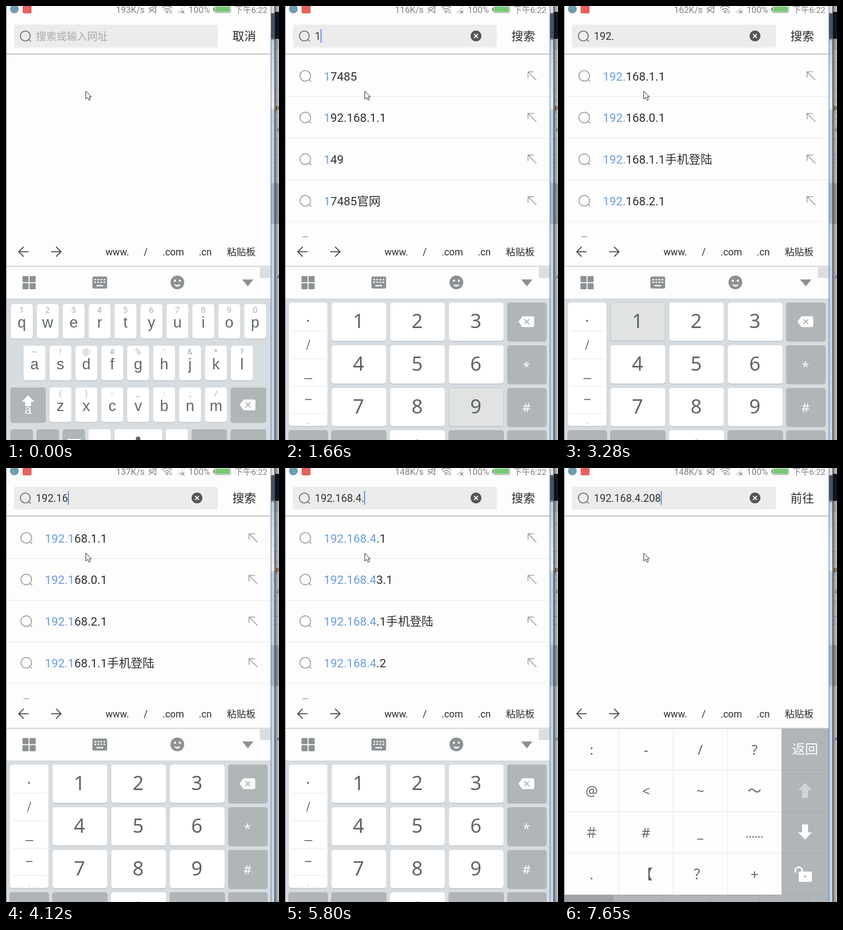
An HTML page that plays this animation: 556 by 884 pixels, repeating every 8 s.

```html
<!DOCTYPE html>
<html lang="zh">
<head>
<meta charset="utf-8">
<style>
html, body { margin: 0; width: 100%; height: 100%; overflow: hidden; background: #fff; }
svg { display: block; font-family: Roboto, "Noto Sans CJK SC", "Noto Sans CJK", sans-serif; }
.arial { font-family: "Liberation Sans", Arial, sans-serif; }
.noto { font-family: "Noto Sans", "Noto Sans CJK SC", "Noto Sans CJK", sans-serif; font-weight: 500; }
</style>
</head>
<body>
<svg id="stage" width="556" height="884" viewBox="0 0 556 884"></svg>
<script>
const LOOP = 8000;
const GRAY = '#b0b5b8', INK = '#5f6569', ICON = '#8c9194', BOARD = '#d7dce0';

const first = ['17485', '192.168.1.1', '149', '17485官网'];
const second = ['192.168.1.1', '1920', '192.168.0.1', '19寸'];
const home = ['192.168.1.1', '192.168.0.1', '192.168.1.1手机登陆', '192.168.2.1'];
const sorted = ['192.168.1.1', '192.168.0.1', '192.168.2.1', '192.168.1.1手机登陆'];
const fourth = ['192.168.4.1', '192.168.43.1', '192.168.4.1手机登陆', '192.168.4.2'];

// Each step changes only the listed parts of the state.
const steps = [
  [0, { speed: 193, board: 'abc', text: '', caret: 0, items: [], hit: '', press: '' }],
  [430, { speed: 153, caret: 1 }],
  [730, { press: 'digits' }],
  [880, { board: 'num', press: '', caret: 0 }],
  [1270, { press: '1', speed: 116 }],
  [1400, { text: '1', press: '', caret: 1 }],
  [1530, { items: first, hit: '1' }],
  [1660, { press: '9' }],
  [1810, { text: '19', press: '' }],
  [1940, { items: second, hit: '19', press: '2' }],
  [2060, { text: '192', press: '', speed: 162 }],
  [2170, { items: home, hit: '192', press: '.' }],
  [2290, { press: '' }],
  [2440, { text: '192.' }],
  [2580, { hit: '192.' }],
  [2710, { caret: 0 }],
  [2840, { caret: 1 }],
  [2980, { caret: 0 }],
  [3280, { press: '1' }],
  [3420, { text: '192.1', press: '', caret: 1 }],
  [3550, { items: sorted, hit: '192.1' }],
  [3820, { caret: 0 }],
  [4120, { text: '192.16', caret: 1, speed: 137 }],
  [4250, { hit: '192.16' }],
  [4390, { text: '192.168', hit: '192.168' }],
  [4690, { text: '192.168.', hit: '192.168.' }],
  [4970, { speed: 153 }],
  [5100, { caret: 0 }],
  [5230, { text: '192.168.4', caret: 1 }],
  [5370, { items: fourth, hit: '192.168.4' }],
  [5670, { text: '192.168.4.', speed: 148 }],
  [5820, { hit: '192.168.4.' }],
  [6070, { text: '192.168.4.2', items: [] }],
  [6230, { press: '0' }],
  [6380, { text: '192.168.4.20', press: '' }],
  [6530, { press: '8' }],
  [6680, { text: '192.168.4.208', press: '' }],
  [7100, { caret: 0 }],
  [7230, { caret: 1 }],
  [7500, { press: 'signs' }],
  [7650, { board: 'signs', press: '' }]
];

const esc = s => String(s).replace(/&/g, '&amp;').replace(/</g, '&lt;');
const rect = (x, y, w, h, fill, r = 0, more = '') =>
  `<rect x="${x}" y="${y}" width="${w}" height="${h}" rx="${r}" fill="${fill}" ${more}/>`;
const disc = (x, y, r, fill, more = '') => `<circle cx="${x}" cy="${y}" r="${r}" fill="${fill}" ${more}/>`;
const fill = (d, color) => `<path d="${d}" fill="${color}"/>`;
const line = (d, color, w = 1) => `<path d="${d}" fill="none" stroke="${color}" stroke-width="${w}"/>`;
const text = (x, y, size, color, s, more = '') =>
  `<text x="${x}" y="${y}" font-size="${size}" fill="${color}" ${more}>${s}</text>`;
const mid = (x, y, size, color, s, font = '') =>
  text(x, y, size, color, esc(s), `text-anchor="middle" class="${font}"`);
const lens = (x, y, color, r = 10.8) =>
  disc(x, y, r, 'none', `stroke="${color}" stroke-width="1.7"`) +
  line(`M${x + r * .7} ${y + r * .7}l4.5 4.5`, color, 1.7);
const textWidth = (s, size) =>
  [...s].reduce((w, c) => w + (c === '.' ? .263 : .5615) * size, 0);

function key(x, y, w, h, face, pressed) {
  const color = pressed ? (face === GRAY ? '#989ea1' : '#e1e3e2') : face;
  return rect(x, y + 1.5, w, h, '#bac0c4', 5) +
    rect(x, y, w, h, color, 5, pressed ? 'stroke="#bfc4c6"' : '');
}

const erase = (x, y) =>
  fill(`M${x - 16} ${y}l8 -11h21q3 0 3 3v16q0 3 -3 3h-21z`, '#fff') +
  line(`M${x - 4} ${y - 5}l10 10m0 -10l-10 10`, GRAY, 2.2);

function statusBar(s) {
  const c = '#808080';
  return disc(17, 6, 9, '#6f9db0') + rect(34, -3, 18, 18, '#e8605c', 3) +
    text(224, 14, 18, c, s.speed + 'K/s') +
    line('M292 4h4l9 -6v16l-9 -6h-4zM291 14l16 -14', c, 1.4) +
    line('M318 4q10 -8 20 0M321 8q7 -6 14 0M324 11q4 -3 8 0', c, 1.4) +
    disc(328, 13, 1.6, c) + line('M334 9v6m3 -6v6', c) +
    line('M351 14v-3m4 3v-6m4 -1v-4m4 -1v-4', '#c4c4c4', 2) + line('M357 9l6 6m0 -6l-6 6', c, 1.6) +
    text(372, 14, 18, c, '100%') +
    rect(424.5, -.5, 33, 14, '#fff', 2, `stroke="${c}"`) + rect(426, 1, 30, 11, '#77c874', 1) +
    rect(422, 4, 2, 6, c) + text(465.5, 14, 17, c, '下午6:22');
}

function searchBar(s) {
  const action = !s.text ? '取消' : /\d+\.\d+\.\d+\.\d/.test(s.text) ? '前往' : '搜索';
  const end = 61 + textWidth(s.text, 21.3);
  return rect(16, 38, 415.5, 46.5, '#ececec', 4) + lens(39.3, 61, '#666', 10) +
    (s.text
      ? text(60.7, 69, 21.3, '#333', s.text) + disc(389, 61, 11, '#555') +
        line('M385 57l8 8m0 -8l-8 8', '#fff', 2)
      : text(61, 69, 20.9, '#a9a9a9', '搜索或输入网址')) +
    (s.caret ? rect(end - .5, 47, 2.2, 28, '#5f94e4') : '') +
    text(461.3, 70, 23.9, '#292929', action) +
    rect(1, 96.7, 539, 2.2, '#c3c3c3');
}

function suggestions(s) {
  if (!s.items.length) return '';
  const rows = s.items.map((item, i) => {
    const y = 142 + i * 84.8;
    const n = item.startsWith(s.hit) ? s.hit.length : 0;
    return lens(41.3, y + .3, '#999') +
      text(79, y + 9.5, 24, '#303030',
        `<tspan fill="#6a9de0">${item.slice(0, n)}</tspan>${item.slice(n)}`) +
      line(`M495 ${y + 4}v-12h12m-12 0l17 17`, '#999', 1.6) +
      rect(1, y + 42, 539, 1, '#e6e6e6');
  });
  return `<g clip-path="url(#list)">${rows.join('')}${lens(41.3, 480.3, '#999')}</g>`;
}

function shortcuts() {
  const c = '#2c2c2c';
  return line('M46 500.5h-20m10 -10l-10 10l10 10M92 500.5h20m-10 -10l10 10l-10 10', '#454545', 2) +
    [['www.', 202.7], ['/', 280.5], ['.com', 319], ['.cn', 392.8]]
      .map(([s, x]) => text(x, 508, 19.5, c, s)).join('') +
    text(449.7, 508, 19.5, c, '粘贴板') + rect(1, 529.5, 539, 1.3, '#b9b9b9');
}

function tools() {
  let out = rect(1, 531, 539, 66, '#fdfdfd');
  for (const x of [33.5, 48]) for (const y of [550, 564.5]) out += rect(x, y, 12.5, 12.5, ICON, 2);
  out += rect(176, 551, 30, 24.5, ICON, 3);
  for (let i = 0; i < 8; i++) out += rect(180 + i % 4 * 6.2, 556 + (i > 3) * 5.5, 3.4, 2.6, '#fff');
  return out + rect(184, 568.5, 14, 2.4, '#fff') +
    disc(349, 563, 14, ICON) + disc(344, 559.5, 2.2, '#fff') + disc(354, 559.5, 2.2, '#fff') +
    fill('M342.5 566.5q6.5 3 13 0q-2 5 -6.5 5t-6.5 -5z', '#fff') +
    fill('M481 557h23l-11.5 14z', ICON) +
    rect(517, 532, 23, 22, '#dcddde') + rect(1, 597, 539, 287, BOARD) +
    rect(1, 596, 539, 1.2, '#cbd0d4');
}

function letters(s) {
  const rows = [
    [10, 607, 'qwertyuiop', '1234567890'],
    [35.8, 692, 'asdfghjkl', "~!@#%'&*?"],
    [88.6, 777, 'zxcvbnm', '()-_:;/']
  ];
  let out = tools();
  for (const [left, y, keys, hints] of rows) {
    [...keys].forEach((c, i) => {
      const x = left + i * 52.8;
      out += key(x, y, 44.5, 70.5, '#fff') +
        mid(x + 22, y + 17.5, 17, '#abafb2', hints[i]) +
        mid(x + 22.2, y + 47.5, 31, INK, c, 'arial');
    });
  }
  out += key(9, 777, 72, 71, GRAY) + key(457.5, 777, 72.5, 71, GRAY) +
    fill('M45 793l13 13h-7v9h-12v-9h-7z', '#fff') +
    mid(45, 831, 25, '#fff', 'a', 'arial') + erase(492, 812.5);
  const bottom = [[9, 46, GRAY], [62, 46, GRAY], [115, 46, GRAY], [168, 45, '#fff'],
    [221, 97, '#fff'], [325.5, 45, '#fff'], [378, 72, GRAY], [457.5, 72.5, GRAY]];
  bottom.forEach(([x, w, face], i) => out += key(x, 862, w, 40, face, i === 1 && s.press === 'digits'));
  return out + rect(125, 882, 27, 3, '#fff') + rect(264.5, 877, 9, 14, INK, 4);
}

function numbers(s) {
  let out = tools() + key(8, 604, 78.5, 251.5, '#fff');
  if (s.press === '.') out += rect(8, 604, 78.5, 58, '#e1e3e2', 5);
  for (const y of [662, 718, 774, 829.5]) out += rect(13, y, 69, 1, '#dfe2e3');
  out += rect(45.2, 639.5, 3.5, 3.5, INK) + line('M44 700l6.5 -20', INK, 1.7) +
    rect(39.5, 758, 16, 1.8, INK) + rect(41, 800.5, 13, 2, INK) + rect(46.5, 850, 2, 2, '#aaa');
  for (let i = 0; i < 9; i++) {
    const x = 95 + i % 3 * 119.5, y = 604 + Math.floor(i / 3) * 87, c = String(i + 1);
    out += key(x, y, 111, 78, '#fff', s.press === c) + mid(x + 54.7, y + 52, 40, INK, c, 'noto');
  }
  for (const y of [604, 691, 778]) out += key(452.5, y, 80.5, 78.5, GRAY);
  out += erase(491.5, 643) + mid(492, 743, 26, '#fff', '*', 'noto') +
    mid(492, 827, 26, '#fff', '#', 'noto');
  const bottom = [[7, 80.5, GRAY], [94, 113, GRAY], [214, 112, '#fff'], [333, 113, GRAY], [452.5, 80.5, GRAY]];
  bottom.forEach(([x, w, face], i) =>
    out += key(x, 864, w, 40, face, i === 0 && s.press === 'signs' || i === 2 && s.press === '0'));
  return out + rect(267, 883, 5, 2, '#a5a9ac', 1);
}

function signs() {
  const cells = [':', '-', '/', '?', '@', '<', '~', '～', '＃', '#', '_', '……', '.', '【', '？', '+'];
  let out = rect(1, 531, 442, 339, '#fdfdfd') + rect(443, 531, 97, 339, GRAY);
  for (let i = 1; i < 4; i++) {
    const y = 529.8 + i * 84.8;
    out += rect(i * 110.6 + .5, 531, 1, 339, '#e1e3e4') +
      rect(1, y, 442, 1, '#dfe1e2') + rect(443, y, 97, 1, '#a3a9ac');
  }
  cells.forEach((c, i) => {
    const x = 56.3 + i % 4 * 110.6, y = 583.5 + Math.floor(i / 4) * 84.8;
    out += mid(x, y, c === '……' ? 23 : 28, INK, c, 'noto');
  });
  out += text(464.5, 582, 26.5, '#fff', '返回') +
    fill('M491 641l14 15h-8v16h-12v-16h-8z', '#d0d4d6') +
    fill('M491 757l14 -15h-8v-16h-12v16h-8z', '#fff') +
    rect(478, 822, 27, 21, '#fff', 3) + disc(491, 832, 2.2, GRAY) +
    line('M471 824v-4a7 7 0 0 1 14 0v3', '#fff', 3) +
    rect(1, 869, 539, 15, GRAY) + rect(1, 869, 99, 15, '#9da3a6') + rect(1, 869, 539, 1, '#a3a9ac');
  for (const x of [199, 298, 397, 497]) out += rect(x, 869, 1, 15, '#9ca2a5');
  return out;
}

function windowEdge() {
  let out = rect(540, 0, 7, 884, 'url(#glass)') + rect(539, 0, 1.2, 884, '#6f7d8d') +
    rect(548, 0, 8, 884, '#f4f4f4') +
    rect(548, 12, 8, 55, '#151c2c') + rect(548, 68, 8, 20, '#dedede') +
    rect(548, 361, 8, 83, '#c8c8c8');
  for (const y of [87, 114, 170, 192, 217, 229, 271, 318]) out += rect(548, y, 8, 1, '#c3c6c9');
  return out + rect(549, 302, 7, 1, '#9fc0e6') +
    text(549, 211, 13, '#9a5a20', 'p', 'font-weight="700"') + text(552, 255, 12, '#555', 'a') +
    text(552, 555, 13, '#3d55c4', 'A', 'font-style="italic"') +
    rect(548, 0, 8, 884, 'url(#shade)') + rect(546.7, 0, 1.3, 884, '#39434f') +
    rect(0, 0, 1, 884, '#5f7084');
}

const defs = `<defs><clipPath id="list"><rect y="99" width="540" height="372"/></clipPath>
<linearGradient id="shade"><stop stop-opacity=".5"/><stop offset="1" stop-opacity=".15"/></linearGradient>
<linearGradient id="glass" gradientUnits="userSpaceOnUse" x1="0" y1="0" x2="0" y2="884">
<stop stop-color="#d8dde2"/><stop offset=".015" stop-color="#d8dde2"/>
<stop offset=".018" stop-color="#48515f"/><stop offset=".073" stop-color="#48515f"/>
<stop offset=".08" stop-color="#b5cee6"/><stop offset=".16" stop-color="#d3e3f2"/>
<stop offset=".235" stop-color="#e4edf5"/><stop offset=".24" stop-color="#b7d2ec"/>
<stop offset=".405" stop-color="#b7d2ec"/><stop offset=".41" stop-color="#9cb7d4"/>
<stop offset=".5" stop-color="#9cb7d4"/><stop offset=".505" stop-color="#bcd6ee"/>
<stop offset="1" stop-color="#bcd6ee"/></linearGradient></defs>`;

const pointer = '<path d="M162.5 173.5v16l4 -3.5l2.5 6l3 -1.3l-2.6 -5.7h4.6z" fill="#fff" stroke="#111"/>';
const boards = { abc: letters, num: numbers, signs };
const stage = document.getElementById('stage');
let shown = 0;

function draw(count) {
  const s = Object.assign({}, ...steps.slice(0, count).map(step => step[1]));
  stage.innerHTML = defs + rect(0, 0, 556, 884, '#fdfdfd') + statusBar(s) + searchBar(s) +
    suggestions(s) + shortcuts() + boards[s.board](s) + windowEdge() + pointer;
}

const start = performance.now();
function tick() {
  const t = (performance.now() - start) % LOOP;
  const count = steps.filter(step => step[0] <= t).length;
  if (count !== shown) draw(shown = count);
  requestAnimationFrame(tick);
}
tick();
</script>
</body>
</html>
```
